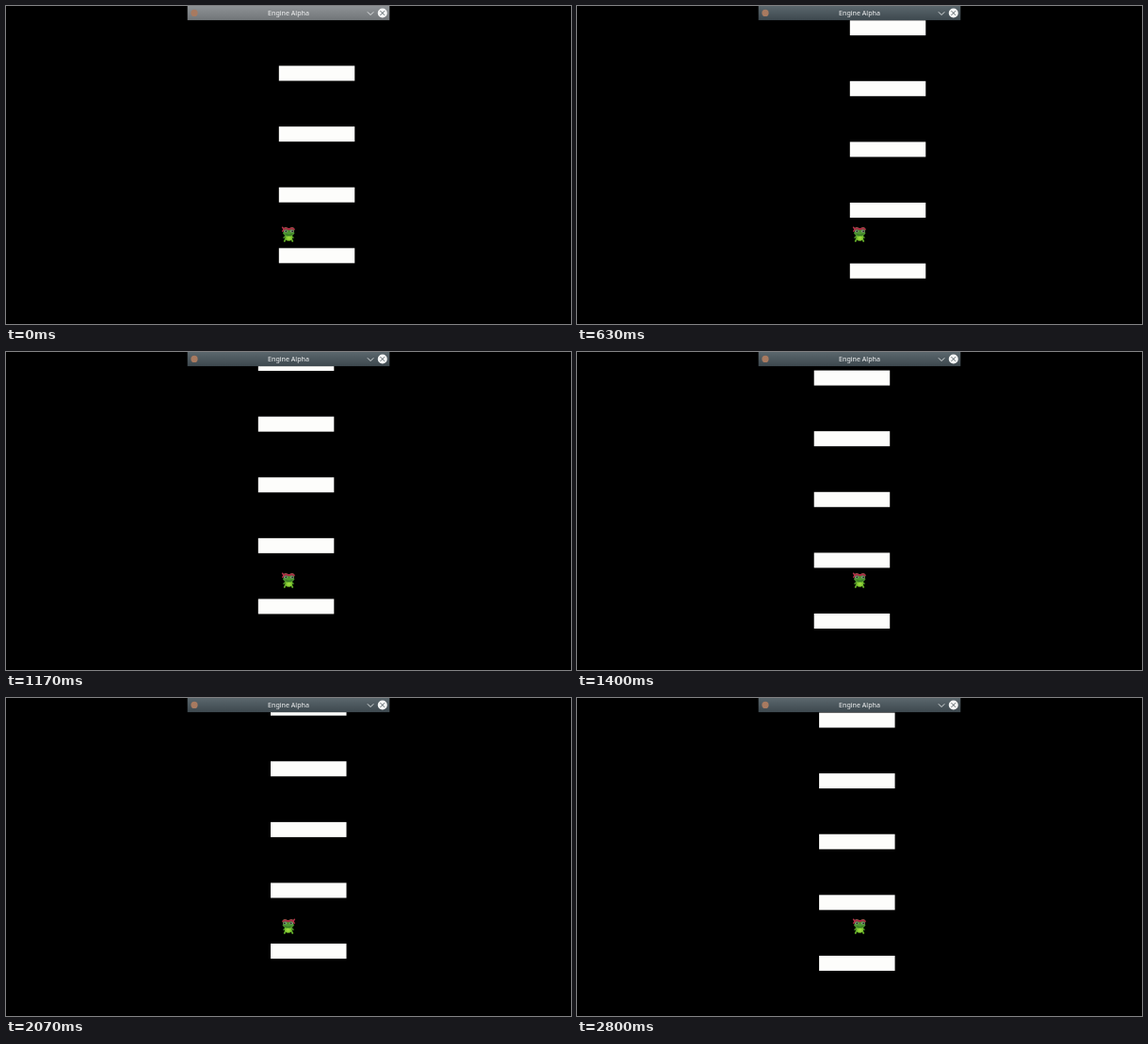
Recreate the animation shown at these times as an HTML page with a canvas. Size 600 by 338 pixels, loop 2.83 s.

```html
<!DOCTYPE html>
<html lang="en">
<head>
<meta charset="utf-8">
<title>Jumping frog</title>
<style>
html, body { margin: 0; width: 100%; height: 100%; overflow: hidden; background: #000; }
canvas { display: block; width: 600px; height: 338px; }
</style>
</head>
<body>
<canvas id="stage" width="600" height="338"></canvas>
<script>
const ctx = document.getElementById('stage').getContext('2d');
const LOOP = 2830, STEP = 100 / 3;
const BAR = { x: 192.7, w: 214.6, h: 15.1 };
const PLATFORM = { x: 289.8, w: 80.5, h: 16, gap: 64.6, rest: 256.3 };
const JUMP = { time: 360, height: 23.5, starts: [-4, 361, 832, 1270, 1726, 2094, 2530] };
const RUN = { speed: 0.069, ease: 190, right: 848, left: 1521, back: 2260 };

// Ramp with slope 1 after zero, its corner rounded over RUN.ease ms
function ramp(t) {
  const half = RUN.ease / 2;
  if (Math.abs(t) > half) return Math.max(0, t);
  return (t + half) ** 2 / (2 * RUN.ease);
}

function platformX(t) {
  const way = ramp(t - RUN.right) - 2 * ramp(t - RUN.left) + 2 * ramp(t - RUN.back);
  return PLATFORM.x - RUN.speed * way;
}

function jumpHeight(t) {
  const start = JUMP.starts.filter(s => s <= t).pop();
  const u = Math.min(1, (t - start) / JUMP.time);
  return 4 * JUMP.height * u * (1 - u);
}

function oval(color, x, y, rx, ry = rx) {
  ctx.fillStyle = color;
  ctx.beginPath();
  ctx.ellipse(x, y, rx, ry, 0, 0, Math.PI * 2);
  ctx.fill();
}

function line(color, width, ...points) {
  ctx.strokeStyle = color;
  ctx.lineWidth = width;
  ctx.beginPath();
  points.forEach(([x, y]) => ctx.lineTo(x, y));
  ctx.stroke();
}

function drawPlatforms(t) {
  const x = platformX(t), y = PLATFORM.rest + jumpHeight(t);
  ctx.fillStyle = '#fdfdfb';
  for (let i = 0; i < 5; i++) {
    ctx.fillRect(x, y - i * PLATFORM.gap, PLATFORM.w, PLATFORM.h);
  }
}

function drawFrog(left) {
  ctx.save();
  ctx.translate(300, 242.3);
  if (left) ctx.scale(-1, 1);
  ctx.lineCap = ctx.lineJoin = 'round';
  for (const side of [-1, 1]) {
    line('#5da428', 1.8, [side * 2.5, 4], [side * 4.3, 7.7]);
    line('#4c8f2a', 1.6, [side * 3, 2], [side * 5, 4]);
  }
  oval('#78c02c', 0.3, 3.6, 3.8, 3.8);
  oval('#4c9430', 0.2, -1, 6, 3.5);
  oval('#98d63c', 0.5, 4.4, 2.3, 2);
  for (const side of [-1, 1]) {
    const x = 0.4 + side * 3.4;
    oval('#54863f', x, -4.8, 2.5);
    line('#a82c44', 2, [0.4, -5], [x, -6.2], [x + side * 2, -5]);
    oval('#94a596', x, -2.9, 1.7, 1.2);
    oval('#1f2b22', x + 0.3, -2.9, 0.9);
  }
  line('#b5304a', 1.5, [-6.4, -7], [-5, -5], [-6.2, -3]);
  line('#2c651f', 0.8, [-2.5, 0.6], [0.5, 1.2], [3.5, 0.6]);
  ctx.restore();
}

function mix(a, b, k) {
  return `rgb(${a.map((v, i) => Math.round(v + (b[i] - v) * k)).join()})`;
}

function drawTitleBar(t) {
  const k = Math.min(1, t / 170);
  const fill = ctx.createLinearGradient(0, 0, 0, BAR.h);
  fill.addColorStop(0, mix([143, 147, 150], [91, 103, 109], k));
  fill.addColorStop(1, mix([113, 117, 120], [61, 72, 78], k));
  ctx.fillStyle = fill;
  ctx.fillRect(BAR.x, 0, BAR.w, BAR.h);

  oval('#a87a60', 200, 7.4, 3.6);
  ctx.fillStyle = '#f4f5f5';
  ctx.font = '7.1px "Noto Sans", sans-serif';
  ctx.textAlign = 'center';
  ctx.fillText('Engine Alpha', 300, 10.4);

  ctx.lineCap = 'butt';
  ctx.lineJoin = 'miter';
  line('#eef0f0', 0.9, [383.9, 6.3], [387.1, 9.5], [390.3, 6.3]);
  oval('#f5f6f6', 399.8, 7.5, 5);
  for (const d of [-2.3, 2.3]) {
    line('#4b565c', 0.9, [399.8 - d, 5.2], [399.8 + d, 9.8]);
  }
}

function draw(t) {
  ctx.fillStyle = '#000';
  ctx.fillRect(0, 0, 600, 338);
  drawPlatforms(t);
  drawFrog(t >= RUN.left && t < RUN.back);
  ctx.fillStyle = '#000';
  ctx.fillRect(0, 0, 600, BAR.h);
  drawTitleBar(t);
}

const began = performance.now();
function tick() {
  const t = (performance.now() - began) % LOOP;
  draw(Math.floor((t + 3.5) / STEP) * STEP);
  requestAnimationFrame(tick);
}
tick();
</script>
</body>
</html>
```
